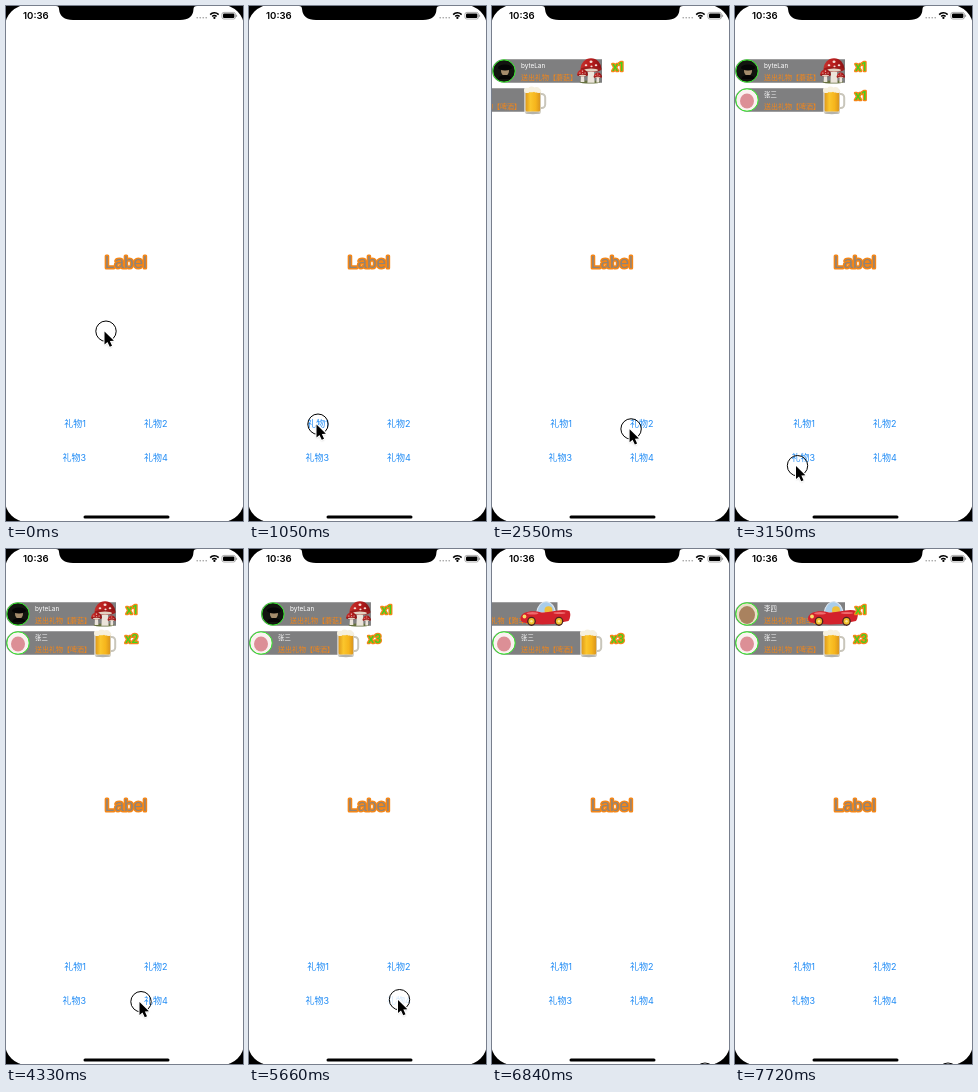
An HTML page with a canvas that plays this animation: 237x515 px, repeating every 8000 ms.

```html
<!DOCTYPE html>
<html lang="zh">
<head>
<meta charset="utf-8">
<title>Gift banners</title>
<style>
html, body { margin: 0; width: 100%; height: 100%; overflow: hidden; background: #fff; }
canvas { display: block; width: 237px; height: 515px; }
</style>
</head>
<body>
<canvas id="stage"></canvas>
<script>
const W = 237, H = 515, LOOP = 8000;
const ORANGE = '#f48617', GREEN = '#3fd31c', BLUE = '#1f8bf5';
const UI = 'Inter, "Noto Sans CJK SC", "Noto Sans CJK", sans-serif';
const ARIAL = '"Liberation Sans", Arial, sans-serif';
const canvas = document.getElementById('stage');
const c = canvas.getContext('2d');
const dpr = window.devicePixelRatio || 1;
canvas.width = W * dpr;
canvas.height = H * dpr;

const clamp = v => Math.max(0, Math.min(1, v));
const smooth = v => v * v * (3 - 2 * v);

// cubic-bezier(.42, 0, .58, 1)
function easeInOut(x) {
  let lo = 0, hi = 1;
  for (let i = 0; i < 14; i++) {
    const s = (lo + hi) / 2, r = 1 - s;
    if (1.26 * s * r * r + 1.74 * s * s * r + s * s * s < x) lo = s; else hi = s;
  }
  return smooth((lo + hi) / 2);
}
const progress = (t, start, length) => easeInOut(clamp((t - start) / length));

// Time, x, y of the pointer ring
const POINTER = [
  [0, 100, 325], [280, 100, 325], [780, 68, 422], [1050, 69, 418], [1340, 69, 418],
  [1950, 147.5, 417], [2100, 150, 417.5], [2380, 150, 417.5], [3150, 62.5, 459.5],
  [3300, 61.5, 462], [3780, 61.5, 460], [4330, 135, 452.5], [4480, 147, 451],
  [4630, 150.5, 450.5], [5690, 150.5, 450.5], [6250, 191, 496.5], [6660, 213, 524], [LOOP, 213, 524]
];

const BUTTONS = [
  { x: 69, y: 417.5, press: [[1300, 1430]] },
  { x: 149.8, y: 417.5, press: [[2150, 2290]] },
  { x: 68.4, y: 451.3, press: [[3400, 3480]] },
  { x: 149.8, y: 451.3, press: [[4620, 4790], [5600, 5740]] }
];

const ROWS = [
  { y: 53, name: 'byteLan', gift: '蘑菇', start: 1325, leave: 5505, hits: [1825], face: darkFace, icon: mushroom },
  { y: 82, name: '张三', gift: '啤酒', start: 2300, hits: [2800, 3480, 4800], face: pinkFace, icon: beer },
  { y: 53, name: '李四', gift: '跑车', start: 6560, hits: [7060], face: brownFace, icon: car }
];

function text(s, x, y, font, color, align = 'left') {
  c.font = font;
  c.fillStyle = color;
  c.textAlign = align;
  c.fillText(s, x, y);
}

function outlined(s, x, y, font, fill, width) {
  c.font = font;
  c.textAlign = 'center';
  c.lineJoin = 'round';
  c.lineWidth = width;
  c.strokeStyle = ORANGE;
  c.strokeText(s, x, y);
  c.fillStyle = fill;
  c.fillText(s, x, y);
}

function oval(x, y, rx, ry, color, from = 0, to = Math.PI * 2) {
  c.beginPath();
  c.ellipse(x, y, rx, ry, 0, from, to);
  c.fillStyle = color;
  c.fill();
}

function box(x, y, w, h, r, color) {
  c.beginPath();
  c.roundRect(x, y, w, h, r);
  c.fillStyle = color;
  c.fill();
}

function shape(points, color) {
  c.beginPath();
  points.forEach(p => c.lineTo(p[0], p[1]));
  c.closePath();
  c.fillStyle = color;
  c.fill();
}

// Horizontal gradient with evenly spaced colours
function blend(x0, x1, ...colors) {
  const g = c.createLinearGradient(x0, 0, x1, 0);
  colors.forEach((color, i) => g.addColorStop(i / (colors.length - 1), color));
  return g;
}

function darkFace() {
  oval(12, 12, 11, 11, '#12140f');
  oval(13, 12, 4, 4.5, '#a58d6c');
  oval(13, 8.5, 7, 3, '#050505');
  oval(13, 20, 6.5, 4, '#050505', Math.PI, Math.PI * 2);
}

function pinkFace() {
  oval(12, 12, 11, 11, '#fbf1f0');
  oval(12, 13, 7, 7.5, '#dc8f96');
}

function brownFace() {
  oval(12, 12, 11, 11, '#eadfc8');
  oval(12, 13, 8, 9, '#a9825f');
}

function toadstool(x, y, s) {
  c.save();
  c.translate(x, y);
  c.scale(s, s);
  shape([[-2.8, -1], [2.8, -1], [3.6, 13.5], [-3.6, 13.5]], '#ebe4da');
  oval(0, 0, 10.5, 11, blend(-10, 10, '#c4302c', '#b81c1c', '#8a1214'), Math.PI, Math.PI * 2);
  oval(0, 0, 10.5, 2.6, '#9c1c1b');
  oval(0, 0.9, 7, 1.6, '#e2d2c2');
  [[-5, -4, 1.3], [0, -7.5, 1.5], [5, -4, 1.3], [0.5, -3, 1.1]]
    .forEach(p => oval(p[0], p[1], p[2], p[2] * 0.8, '#f4dcd4'));
  c.restore();
}

function mushroom() {
  oval(98, 23, 10.5, 1.6, '#66713f');
  toadstool(99, 10.3, 1);
  toadstool(90.5, 16, 0.52);
  toadstool(105.8, 18, 0.4);
}

function beer() {
  box(88.5, -2, 24, 29, 0, '#fff');
  c.lineWidth = 2;
  c.strokeStyle = '#c9c6bb';
  c.beginPath();
  c.roundRect(101, 6, 8.2, 14, 3.5);
  c.stroke();
  box(88.8, 1, 16.2, 25, 2.5, '#d6d3c8');
  box(89.6, 3, 14.6, 20.5, 1.5, blend(89, 105, '#dc951a', '#fbc62c', '#f6b51c', '#d58f1d'));
  oval(96.9, 25, 7.2, 1.2, '#b4b2aa');
  [[91, 2.4, 3], [95.5, 1.4, 3.4], [100.5, 1.8, 3.3], [103, 3.2, 2.2]]
    .forEach(p => oval(p[0], p[1], p[2], p[2] * 0.85, '#f6f0de'));
}

function wheel(x, y) {
  oval(x, y, 4.3, 4.6, '#4a2420');
  oval(x, y, 3, 3.2, '#f0c02c');
  oval(x, y, 1.2, 1.3, '#fbe9a0');
}

function car() {
  c.beginPath();
  c.moveTo(89, 11);
  c.quadraticCurveTo(91, 0, 99, -0.5);
  c.quadraticCurveTo(106, 1, 108, 10);
  c.closePath();
  c.fillStyle = '#a9cdea';
  c.fill();
  c.strokeStyle = '#dfe6ee';
  c.lineWidth = 1.1;
  c.stroke();
  oval(101, 8.5, 4, 4.2, '#efc03a');
  c.beginPath();
  c.moveTo(73, 16);
  c.bezierCurveTo(74, 9, 86, 8, 94, 10.5);
  c.bezierCurveTo(104, 11, 112, 6, 122, 9);
  c.quadraticCurveTo(124, 14, 121, 19);
  c.quadraticCurveTo(98, 25, 76, 20.5);
  c.quadraticCurveTo(73, 19.5, 73, 16);
  c.fillStyle = '#d3222c';
  c.fill();
  oval(85, 11.3, 6, 1.3, '#ee6a6d');
  oval(112, 11, 6, 1.1, '#ee6a6d');
  oval(77, 14.5, 1.9, 1.9, '#f8dc6a');
  wheel(84, 19.3);
  wheel(111.5, 19.3);
}

// Grow, shrink, then settle with a small spring
function pulse(t) {
  if (t < 125) return 1 + 1.75 * easeInOut(t / 125);
  if (t < 250) return 2.75 - 2.05 * easeInOut((t - 125) / 125);
  const u = t - 250;
  return u > 500 ? 1 : 1 - 0.3 * Math.exp(-u / 90) * Math.cos(u / 50);
}

function drawRow(row, t) {
  if (t < row.start) return;
  let x = -112 * (1 - progress(t, row.start, 500));
  if (row.leave) x += W * progress(t, row.leave, 980);
  if (x >= W) return;
  c.save();
  c.translate(x, row.y);
  box(0, 0.2, 110, 23.6, [12, 0, 0, 12], '#7f7f80');
  row.face();
  c.beginPath();
  c.arc(12, 12, 11.2, 0, Math.PI * 2);
  c.lineWidth = 1;
  c.strokeStyle = '#35ee2b';
  c.stroke();
  text(row.name, 29, 9.4, '6.4px ' + UI, '#fff');
  text(`送出礼物【${row.gift}】`, 29, 20.8, '7px ' + UI, ORANGE);
  row.icon();
  const count = row.hits.filter(h => t >= h).length;
  if (count) {
    const s = pulse(t - row.hits[count - 1]);
    c.translate(125.6, 7.5);
    c.scale(s, s);
    outlined('x' + count, 0, 4.1, '600 11.2px ' + UI, GREEN, 2.6);
  }
  c.restore();
}

function drawButtons(t) {
  BUTTONS.forEach((b, i) => {
    c.globalAlpha = b.press.some(p => t >= p[0] && t < p[1]) ? 0.2 : 1;
    text('礼物' + (i + 1), b.x, b.y + 3.4, '9px ' + UI, BLUE, 'center');
  });
  c.globalAlpha = 1;
}

function drawStatus() {
  text('10:36', 17, 13, '600 9.6px ' + UI, '#000');
  for (let i = 0; i < 4; i++) oval(191.2 + i * 3, 11.8, 0.8, 0.8, '#9a9a9a');
  c.strokeStyle = '#000';
  c.lineWidth = 1.5;
  [3, 5.8].forEach(r => {
    c.beginPath();
    c.arc(208.4, 12.6, r, -Math.PI * 0.76, -Math.PI * 0.24);
    c.stroke();
  });
  oval(208.4, 11.9, 1.1, 1.1, '#000');
  c.lineWidth = 0.7;
  c.strokeStyle = '#8c8c8c';
  c.beginPath();
  c.roundRect(215.9, 6.4, 13.6, 6.6, 2);
  c.stroke();
  box(217, 7.4, 11.4, 4.6, 1.1, '#000');
  box(230.2, 8.6, 0.9, 2.4, 0.4, '#8c8c8c');
}

function drawDevice() {
  c.fillStyle = '#000';
  c.beginPath();
  c.rect(-2, -2, W + 4, H + 4);
  c.roundRect(-1, -1, W + 2, H + 2, 22);
  c.fill('evenodd');
  c.beginPath();
  c.moveTo(50, 0);
  c.quadraticCurveTo(53, 0, 53, 3);
  c.quadraticCurveTo(54, 14, 67, 14);
  c.lineTo(174, 14);
  c.quadraticCurveTo(187, 14, 187.5, 3);
  c.quadraticCurveTo(187.5, 0, 191, 0);
  c.fill();
  box(77.5, 509.5, 86, 3, 1.5, '#000');
}

function drawPointer(t) {
  const i = POINTER.findIndex(k => k[0] > t);
  const a = POINTER[i - 1], b = POINTER[i];
  const k = smooth((t - a[0]) / (b[0] - a[0]));
  c.save();
  c.translate(a[1] + (b[1] - a[1]) * k, a[2] + (b[2] - a[2]) * k);
  c.beginPath();
  c.arc(0, 0.2, 10.2, 0, Math.PI * 2);
  c.lineWidth = 1;
  c.strokeStyle = '#000';
  c.stroke();
  c.translate(-1.5, 0.4);
  c.scale(0.94, 0.94);
  const arrow = [[0, 0], [0, 14], [3.2, 11.2], [5.6, 16.4], [8, 15.3], [5.7, 10.3], [10, 10]];
  c.shadowColor = 'rgba(0,0,0,.35)';
  c.shadowBlur = 2 * dpr;
  c.shadowOffsetY = dpr;
  shape(arrow, '#000');
  c.shadowColor = 'transparent';
  c.lineJoin = 'round';
  c.lineWidth = 2.2;
  c.strokeStyle = '#fff';
  c.stroke();
  shape(arrow, '#000');
  c.restore();
}

function draw(t) {
  c.setTransform(dpr, 0, 0, dpr, 0, 0);
  c.fillStyle = '#fff';
  c.fillRect(0, 0, W, H);
  outlined('Label', 119.9, 262.2, '17.2px ' + ARIAL, '#8f8378', 3);
  drawButtons(t);
  ROWS.forEach(row => drawRow(row, t));
  drawStatus();
  drawDevice();
  drawPointer(t);
}

let begin;
function tick(now) {
  if (begin === undefined) begin = now;
  draw((now - begin) % LOOP);
  requestAnimationFrame(tick);
}
requestAnimationFrame(tick);
</script>
</body>
</html>
```
